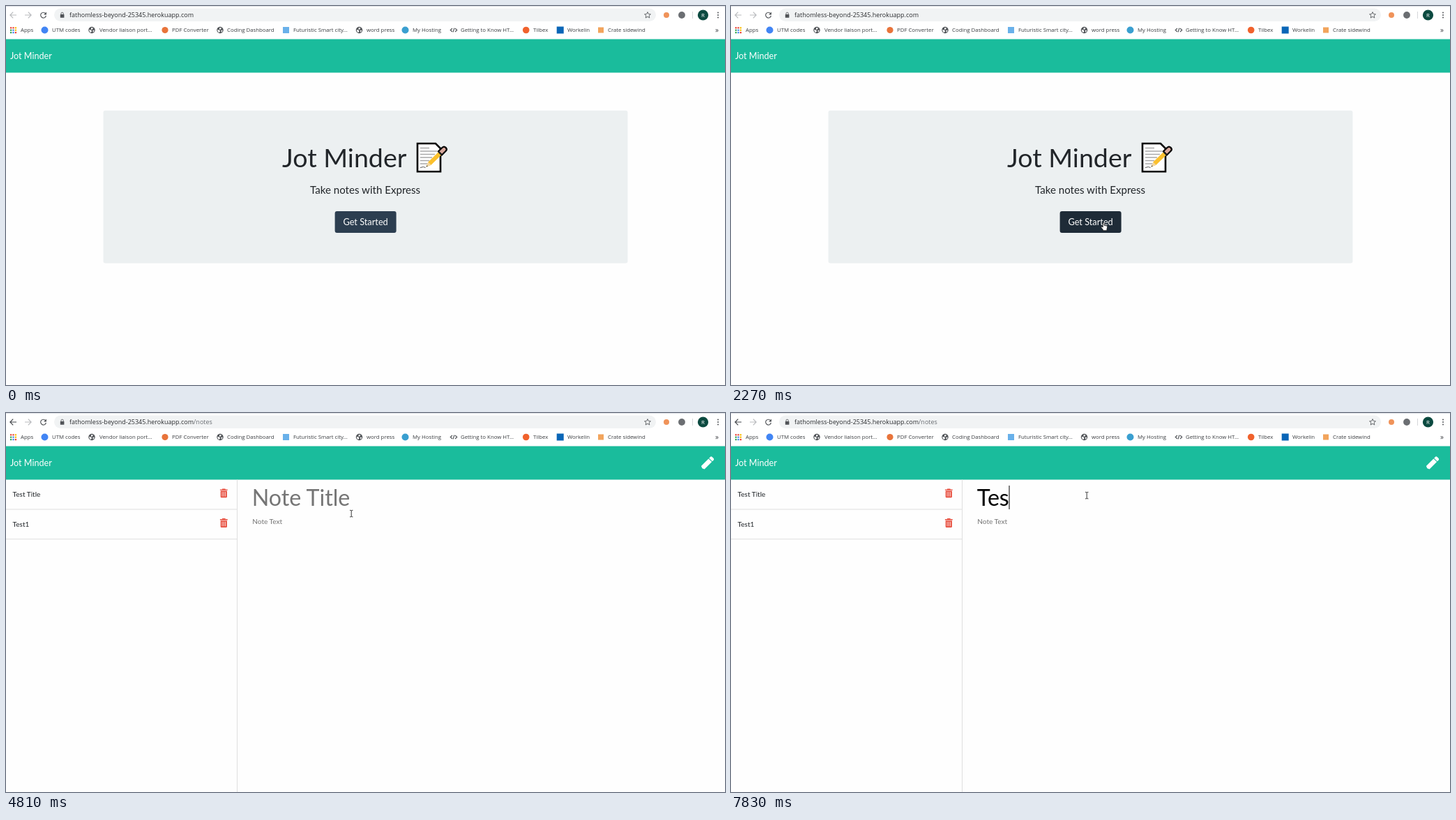
Write an HTML page that moves like this. It is 1031x543 px and loops after 8000 ms.

```html
<!DOCTYPE html>
<html lang="en">
<head>
<meta charset="utf-8">
<title>Jot Minder</title>
<style>
  html, body { margin: 0; width: 100%; height: 100%; overflow: hidden; background: #fefefe; }
  svg { display: block; width: 1031px; height: 543px; }
  text { font-family: Lato, sans-serif; font-size: 10.07px; fill: #212529; }
  .chrome, .chrome text { font-family: "Open Sans", "Noto Sans", sans-serif; font-size: 7.8px; fill: #3a3d40; }
  .chrome .url { font-size: 9px; fill: #2b2d30; }
  .url tspan { fill: #6b6f74; }
  .line { fill: none; stroke: #55585c; stroke-width: 1.2; }
  #back { stroke: #b9bbbe; }
  #back.on { stroke: #45484c; }
  .hint { fill: #757575; }
  .title { font-size: 32.2px; }
  #button rect { fill: #2c3e50; }
  #button.hover rect { fill: #1e2b37; }
  #button .ring { fill: none; stroke: #8b949d; stroke-width: 2; visibility: hidden; }
  #button.focus .ring { visibility: visible; }
  #button.hover .ring { fill: none; }
</style>
</head>
<body>
<svg viewBox="0 0 1031 543">
  <defs>
    <g id="globe">
      <circle r="4.7" fill="#505357"/>
      <path d="M-3.6-.8L-.6.2 0 1.6-1.3 3.6Q-3.8 2.5-3.6-.8ZM-.8-3.5L2-3 1-1.2-1-.6ZM1.4.3L3.6.2Q3.5 2.2 1.8 3.2Z" fill="#fff"/>
    </g>
    <g id="trash" fill="#e74c3c">
      <path d="M-5.4-5.6H-2.6L-2-6.6H2L2.6-5.6H5.4V-4.2H-5.4Z"/>
      <path d="M-4.6-3.5H4.6V5Q4.6 6.3 3.4 6.3H-3.4Q-4.6 6.3-4.6 5Z"/>
      <path d="M-2.3-2V4.7M0-2V4.7M2.3-2V4.7" stroke="#fff" stroke-width=".8"/>
    </g>
  </defs>

  <rect width="1031" height="543" fill="#fefefe"/>
  <g class="chrome" id="chrome">
    <rect width="1031" height="47.5" fill="#fff"/>
    <rect width="1031" height="1" fill="#dee1e6"/>
    <path id="back" class="line" d="M15 13H6M10.2 8.7L5.9 13 10.2 17.3"/>
    <path class="line" style="stroke:#b9bbbe" d="M27 13H36M31.8 8.7L36.1 13 31.8 17.3"/>
    <g id="reload">
      <path class="line" d="M56.7 10.8A3.9 3.9 0 1 0 57.4 14"/>
      <path d="M58 8.4V12.4H54Z" fill="#55585c"/>
    </g>
    <path id="stop" class="line" d="M49.8 9.3L57.2 16.7M57.2 9.3L49.8 16.7"/>
    <rect x="69" y="3.5" width="863" height="18.5" rx="9.2" fill="#f1f3f4"/>
    <rect x="77.8" y="12" width="5.6" height="4.8" rx=".5" fill="#505357"/>
    <path class="line" style="stroke-width:.9" d="M79 12V10.8A1.6 1.6 0 0 1 82.2 10.8V12"/>
    <text class="url" x="91" y="16.2">fathomless-beyond-25345.herokuapp.com<tspan id="path">/notes</tspan></text>
    <path class="line" style="stroke-width:.9" d="M920 8.6L921.3 11.5 924.4 11.8 922.1 13.9 922.8 17 920 15.3 917.2 17 917.9 13.9 915.6 11.8 918.7 11.5Z"/>
    <circle cx="947" cy="13" r="4" fill="#f0935a"/>
    <circle cx="969" cy="13" r="4.9" fill="#6b6e72"/>
    <path d="M984.5 8V18" stroke="#d5d7da"/>
    <circle cx="999.5" cy="13" r="7.6" fill="#0b4a40"/>
    <text x="999.5" y="15.7" text-anchor="middle" style="fill:#fff">R</text>
    <path d="M1021 9.6h.01M1021 13h.01M1021 16.4h.01" stroke="#55585c" stroke-width="2" stroke-linecap="round"/>
    <text x="1017" y="37.5" style="font-size:10px">»</text>
    <circle cx="55.5" cy="34.5" r="5" fill="#4285f4"/>
    <circle cx="228" cy="34.5" r="4.6" fill="#e8743b"/>
    <rect x="397" y="30" width="9" height="9" fill="#69b1ea"/>
    <circle cx="572.5" cy="34.5" r="5" fill="#3a9fd0"/>
    <path class="line" d="M640 32L637.3 34.5 640 37M644 32L646.7 34.5 644 37M642.8 31.6L641.2 37.4"/>
    <circle cx="745.7" cy="34.5" r="4.8" fill="#f0622d"/>
    <rect x="789.7" y="29.5" width="10" height="10" fill="#0a66b7"/>
    <rect x="849" y="30.5" width="8" height="8" fill="#f2a45c"/>
    <use href="#globe" x="123" y="34.5"/>
    <use href="#globe" x="307" y="34.5"/>
    <use href="#globe" x="506.5" y="34.5"/>
  </g>

  <rect y="47.5" width="1031" height="48" fill="#1abc9c"/>
  <text x="6" y="75.7" style="font-size:12.58px;fill:#fff">Jot Minder</text>

  <g id="home">
    <rect x="139.5" y="149.7" width="752" height="218.8" rx="3" fill="#ecf0f1"/>
    <text x="396" y="230.5" style="font-size:37.6px">Jot Minder</text>
    <path d="M590 197H616L623 204V237.3H590Z" fill="#fff" stroke="#000" stroke-width="2.6"/>
    <path d="M594 203.5H607M594 208H618M594 212.5H615M594 217H611M594 221.5H607M594 226H604" stroke="#a9a9a9" stroke-width="1.3"/>
    <path d="M594 231.5Q599 229.5 601.5 231.5" fill="none" stroke="#555"/>
    <g transform="translate(602.5 230.5) rotate(-44.5)">
      <path d="M0 0L7-3H36Q39.5-3 39.5 0T36 3H7Z" fill="#fbc02d"/>
      <path d="M0 0L7-3V3Z" fill="#f3d6a2"/>
      <path d="M28-3.6H36Q39.4-3.6 39.4 0T36 3.6H28Z" fill="#d8a79b" stroke="#000" stroke-width="2.2"/>
      <path d="M28-3V3" stroke="#222" stroke-width="2"/>
      <path d="M0 0L2.2-1V1Z" fill="#333"/>
    </g>
    <text x="436" y="269" style="font-size:15.1px">Take notes with Express</text>
    <g id="button">
      <rect x="471.6" y="294" width="88" height="31" rx="3"/>
      <rect class="ring" x="470.6" y="293" width="90" height="33" rx="4"/>
      <text x="515.6" y="314.2" text-anchor="middle" style="font-size:12.75px;fill:#fff">Get Started</text>
    </g>
  </g>

  <g id="notes">
    <path d="M331.5 95.5V543" stroke="#dfdfdf"/>
    <g transform="translate(998.3 79.2) rotate(-45)" fill="#fff">
      <path d="M0 0L1.3-3.3H16.2V3.3H1.3Z"/>
      <path d="M17.3-3.3H19.6Q21.6-3.3 21.6-1.3V1.3Q21.6 3.3 19.6 3.3H17.3Z"/>
    </g>
    <g id="list">
      <path d="M0 138H331M0 180.7H331" stroke="#dfdfdf"/>
      <text x="9.5" y="120.3">Test Title</text>
      <text x="9.5" y="163">Test1</text>
      <use href="#trash" x="312.3" y="115"/>
      <use href="#trash" x="312.3" y="157.7"/>
    </g>
    <text id="title" class="title hint" x="352.8" y="133">Note Title</text>
    <text class="hint" x="353.3" y="159.3">Note Text</text>
    <rect id="caret" y="104" width="1" height="34" fill="#000"/>
  </g>

  <g id="cursor">
    <path id="arrow" d="M.5.5V9L2.5 7.2 3.8 10 5 9.4 3.8 6.8H6.3Z" fill="#fff" stroke="#222" stroke-width=".8"/>
    <path id="hand" d="M-.8 7V1Q-.8 0 .2 0T1.2 1V4.2L4.8 5Q5.8 5.3 5.7 6.5L5 10V11.8H-.6V10.6L-3 7.4Q-3.4 6.5-2.5 6.1-1.6 6-.8 7Z" fill="#fff" stroke="#222" stroke-width=".9"/>
    <path id="beam" d="M-2-4.6H-.6L.2-4 1-4.6H2.4M-2 4.8H-.6L.2 4.2 1 4.8H2.4M.2-4V4.2" fill="none" stroke="#222" stroke-width=".9"/>
  </g>
</svg>
<script>
const LOOP = 8000;
const $ = id => document.getElementById(id);
const show = (id, on) => $(id).style.visibility = on ? "inherit" : "hidden";
const draw = (tag, attrs, text = "") => {
  const el = document.createElementNS("http://www.w3.org/2000/svg", tag);
  for (const key in attrs) el.setAttribute(key, attrs[key]);
  el.textContent = text;
  $("chrome").append(el);
};

const bookmarks = {
  21: "Apps", 66: "UTM codes", 134: "Vendor liaison port...", 238: "PDF Converter",
  317: "Coding Dashboard", 412: "Futuristic Smart city...", 517: "word press", 583: "My Hosting",
  652: "Getting to Know HT...", 756: "Tilbex", 805: "Workelin", 863: "Crate sidewind"
};
for (const x in bookmarks) draw("text", { x, y: 37.3 }, bookmarks[x]);

const dots = ["#ea4335", "#ea4335", "#fbbc05", "#34a853", "#4285f4", "#fbbc05", "#34a853", "#4285f4", "#ea4335"];
dots.forEach((fill, i) =>
  draw("rect", { x: 6 + i % 3 * 3.4, y: 30.2 + Math.floor(i / 3) * 3.4, width: 2.2, height: 2.2, fill }));

// Pointer moves: first step, last step, step count, end x, end y
const moves = [
  [310, 540, 4, 875, 495], [770, 930, 3, 756, 438], [1250, 1390, 3, 611, 381],
  [1790, 1790, 1, 578, 357], [1870, 2270, 6, 534, 310], [2570, 2570, 1, 536, 313],
  [2740, 2740, 1, 537, 317], [3890, 4120, 4, 466, 215], [4197, 4350, 3, 480, 168],
  [4650, 4810, 3, 495, 144], [4870, 5180, 5, 510, 118]
];

function pointer(t) {
  let x = 968, y = 542;
  for (const [from, to, count, endX, endY] of moves) {
    if (t < from) break;
    const gap = (to - from) / (count - 1 || 1);
    const step = t >= to ? count : Math.floor((t - from) / gap) + 1;
    x += (endX - x) * step / count;
    y += (endY - y) * step / count;
  }
  return [Math.round(x), Math.round(y)];
}

// Typed characters and caret position
function typing(t) {
  if (t >= 7830) return ["Tes", 398.5];
  if (t >= 7670) return ["Te", 384.8];
  if (t >= 7360) return ["T", 369.3];
  return ["", 352];
}

function render(t) {
  const [x, y] = pointer(t);
  const onNotes = t >= 3190;
  const hover = !onNotes && x > 471 && x < 560 && y > 293 && y < 325;
  const beam = t >= 3890;
  const hand = !beam && (hover || onNotes);
  $("cursor").setAttribute("transform", `translate(${x} ${y})`);
  show("cursor", t >= 310);
  show("arrow", t >= 310 && !hand && !beam);
  show("hand", hand);
  show("beam", beam);

  $("button").setAttribute("class", (hover ? "hover " : "") + (t >= 2810 ? "focus" : ""));
  $("home").style.display = onNotes ? "none" : "";
  $("notes").style.display = onNotes ? "" : "none";
  show("list", t >= 3260);

  const loading = t >= 2960 && t < 3190;
  show("stop", loading);
  show("reload", !loading);
  show("path", t >= 3030);
  $("back").classList.toggle("on", t >= 3030);

  const [typed, caretX] = typing(t);
  $("title").textContent = typed || "Note Title";
  $("title").style.fill = typed ? "#000" : "";
  $("caret").setAttribute("x", caretX);
  show("caret", t >= 5420 && t < 5970 || t >= 6520 && t < 6980 || t >= 7360);
}

const start = performance.now();
function tick() {
  render((performance.now() - start) % LOOP);
  requestAnimationFrame(tick);
}
tick();
</script>
</body>
</html>
```
